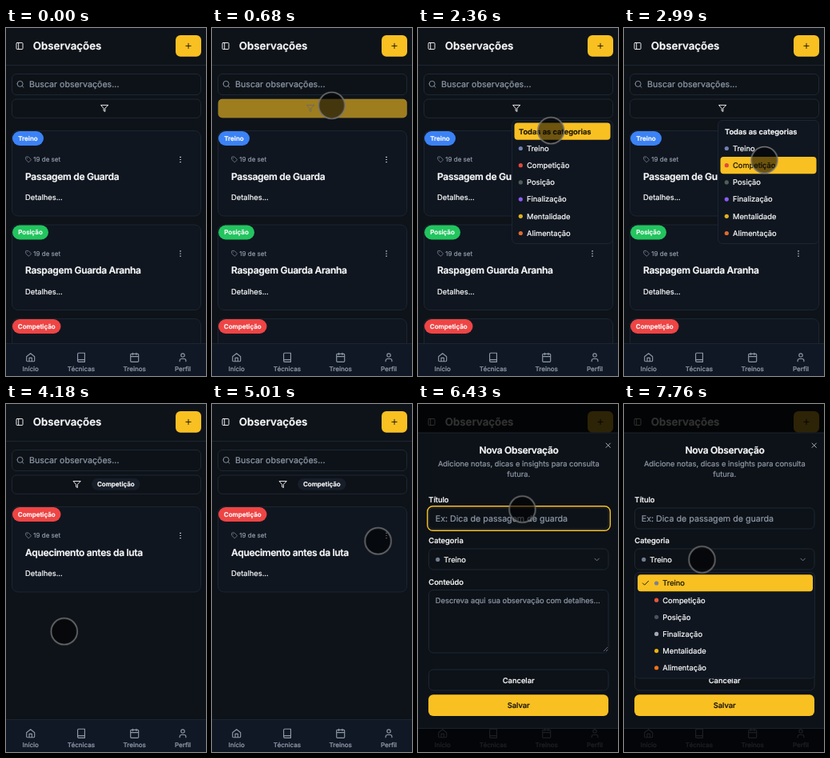
Recreate the animation shown at these times as an HTML page. Size 250 by 435 pixels, loop 8 s.

```html
<!DOCTYPE html>
<html lang="pt-BR">
<head>
<meta charset="utf-8">
<title>Observações</title>
<style>
html, body { margin: 0; width: 100%; height: 100%; overflow: hidden; background: #0e1319; }
svg { display: block; }
#stage { width: 250px; height: 435px; font-family: Inter, "Open Sans", sans-serif; }
text { text-rendering: geometricPrecision; stroke-width: .22px; stroke-linejoin: round; }
.bg { fill: #0e1319; }
.card { fill: #0f1620; stroke: #1c2531; }
.field { fill: #0d1218; stroke: #1e2733; }
.bar { fill: #101826; }
.gold { fill: #f9c022; }
.pill { fill: #171e29; }

/* One loop is 8000 ms: 1% = 80 ms */
.anim, .cut { animation: 8s linear infinite; }
.cut { animation-timing-function: step-end; }
.hover { animation-name: hover; }
.all { animation-name: all; }
.filtered { animation-name: filtered; }
.menu { animation-name: menu; transform-origin: 180px 115px; }
.hot0 { animation-name: hot0; }
.hot1 { animation-name: hot1; }
.hot2 { animation-name: hot2; }
.add { animation-name: add; }
.overlay { animation-name: overlay; }
.dialog { animation-name: dialog; transform-origin: 125px 221px; }
.focus { animation-name: focus; }
.options { animation-name: options; transform-origin: 125px 210px; }
.cursor { animation-name: path; }
.seen { animation-name: seen; }
.press { animation-name: press; }

@keyframes hover {
  0%, 7.4% { opacity: 0; }
  9.2%, 22.7% { opacity: 1; }
  24.5%, 100% { opacity: 0; }
}
@keyframes all { 0% { opacity: 1; } 41.4%, 100% { opacity: 0; } }
@keyframes filtered { 0% { opacity: 0; } 41.4%, 100% { opacity: 1; } }
@keyframes menu {
  0%, 22.7% { opacity: 0; transform: translateY(-5px) scale(.95); }
  24.5%, 41.4% { opacity: 1; transform: none; }
  43%, 100% { opacity: 0; transform: scale(.95); }
}
@keyframes hot0 { 0% { opacity: 0; } 27.2% { opacity: 1; } 32.2%, 100% { opacity: 0; } }
@keyframes hot1 { 0% { opacity: 0; } 32.2% { opacity: 1; } 36.4%, 100% { opacity: 0; } }
@keyframes hot2 { 0% { opacity: 0; } 36.4%, 100% { opacity: 1; } }
@keyframes add {
  0%, 67% { fill: #f9c022; }
  69%, 100% { fill: #e1ae20; }
}
@keyframes overlay { 0%, 73% { opacity: 0; } 75.5%, 100% { opacity: 1; } }
@keyframes dialog {
  0%, 73% { opacity: 0; transform: scale(.95); animation-timing-function: ease-out; }
  75.5%, 100% { opacity: 1; transform: none; }
}
@keyframes focus { 0% { opacity: 1; } 94.4%, 100% { opacity: 0; } }
@keyframes options {
  0%, 94.4% { opacity: 0; transform: translateY(-4px) scale(.95); }
  96%, 100% { opacity: 1; transform: none; }
}
@keyframes path {
  0%, 2.375% { transform: translate(22px, 414px); animation-timing-function: ease-out; }
  8.75% { transform: translate(150px, 96px); }
  11%, 13.5% { transform: translate(153.5px, 112px); }
  16%, 23.75% { transform: translate(153.5px, 102.5px); }
  31.25% { transform: translate(170px, 136px); }
  37.375%, 40.5% { transform: translate(175.5px, 165px); animation-timing-function: ease-in-out; }
  45.625%, 48.1% { transform: translate(53px, 318px); }
  48.2%, 50.2% { transform: translate(53px, 319px); }
  52.25% { transform: translate(72.5px, 284.5px); animation-timing-function: cubic-bezier(.3, .4, .6, 1); }
  60%, 60.5% { transform: translate(174px, 183px); }
  62.625% { transform: translate(207.5px, 171.5px); animation-timing-function: cubic-bezier(.3, .3, .4, 1); }
  70.5%, 73.5% { transform: translate(230px, 20px); animation-timing-function: cubic-bezier(.5, 0, .7, .8); }
  80.375% { transform: translate(130.5px, 131.5px); }
  82.125%, 82.6% { transform: translate(117px, 142px); animation-timing-function: ease-in-out; }
  89% { transform: translate(100px, 213px); animation-timing-function: ease-in-out; }
  92.625%, 100% { transform: translate(97.5px, 194.5px); }
}
@keyframes seen { 0% { opacity: 0; } 2.375%, 100% { opacity: 1; } }
@keyframes press {
  0% { opacity: 0; }
  21.7% { opacity: 1; } 23.5% { opacity: 0; }
  40.5% { opacity: 1; } 42.2% { opacity: 0; }
  72.1% { opacity: 1; } 73.8% { opacity: 0; }
  93.5% { opacity: 1; } 95.2%, 100% { opacity: 0; }
}
</style>
</head>
<body>
<svg id="stage" viewBox="0 0 250 435"></svg>
<script>
const WHITE = '#f8f9fa', MUTED = '#8e97a5', DARK = '#17140a';
const XS = 8, SM = 9.333, MD = 10.667, LG = 12, XL = 13.333;

const icons = {
  panel: 'M5 3h14a2 2 0 0 1 2 2v14a2 2 0 0 1-2 2H5a2 2 0 0 1-2-2V5a2 2 0 0 1 2-2zM9 3v18',
  plus: 'M5 12h14M12 5v14',
  search: 'M3 11a8 8 0 1 0 16 0a8 8 0 1 0-16 0M21 21l-4.3-4.3',
  funnel: 'M22 3H2l8 9.5V19l4 2v-8.5z',
  tag: 'M12.6 2.6A2 2 0 0 0 11.2 2H4a2 2 0 0 0-2 2v7.2a2 2 0 0 0 .6 1.4l8.7 8.7a2.4 2.4 0 0 0 3.4 0l6.6-6.6a2.4 2.4 0 0 0 0-3.4zM7.5 7.5h.01',
  dots: 'M11.5 5h1M11.5 12h1M11.5 19h1',
  home: 'M3 10l9-7 9 7v9a2 2 0 0 1-2 2H5a2 2 0 0 1-2-2zM9 21v-8h6v8',
  book: 'M4 19.5v-15A2.5 2.5 0 0 1 6.5 2H20v20H6.5a2.5 2.5 0 0 1 0-5H20',
  calendar: 'M5 4h14a2 2 0 0 1 2 2v14a2 2 0 0 1-2 2H5a2 2 0 0 1-2-2V6a2 2 0 0 1 2-2zM3 10h18M8 2v4M16 2v4',
  user: 'M19 21v-2a4 4 0 0 0-4-4H9a4 4 0 0 0-4 4v2M8 7a4 4 0 1 0 8 0a4 4 0 1 0-8 0',
  close: 'M18 6L6 18M6 6l12 12',
  check: 'M20 6L9 17l-5-5',
  chevron: 'M6 9l6 6 6-6'
};

const icon = (name, x, y, size = MD, color = WHITE, weight = 2.1) =>
  `<path d="${icons[name]}" fill="none" stroke="${color}" stroke-width="${weight}" stroke-linecap="round" stroke-linejoin="round"
    transform="translate(${x - size / 2} ${y - size / 2}) scale(${size / 24})"/>`;

// y is the middle of the capitals
const text = (str, x, y, size, color = WHITE, weight = 400, extra = '') =>
  `<text x="${x}" y="${y + size * .364}" font-size="${size}" font-weight="${weight}" fill="${color}" stroke="${color}" ${extra}>${str}</text>`;
const centered = (str, x, y, size, color, weight, extra = '') =>
  text(str, x, y, size, color, weight, 'text-anchor="middle" ' + extra);
const tight = 'letter-spacing="-.3"';

const box = (x, y, w, h, r, cls, extra = '') =>
  `<rect x="${x}" y="${y}" width="${w}" height="${h}" rx="${r}" class="${cls}" ${extra}/>`;
const dot = (x, y, color) => `<circle cx="${x}" cy="${y}" r="2.6" fill="${color}"/>`;
const group = (cls, ...parts) => `<g class="${cls}">${parts.join('')}</g>`;

const tags = {
  Treino: { color: '#3b82f6', width: 39 },
  'Posição': { color: '#22c55e', width: 45 },
  'Competição': { color: '#ef4444', width: 60.5 }
};

const card = (i, tag, title) => {
  const { color, width } = tags[tag];
  return `<g transform="translate(0 ${i * 117.5})">` +
    box(7.5, 128.5, 236, 106.5, 7.5, 'card') +
    box(8, 129, width, 18, 9, '', `fill="${color}"`) +
    centered(tag, 8 + width / 2, 138, XS, WHITE, 600) +
    icon('tag', 28, 164.3, 8, MUTED) + text('19 de set', 34.3, 164.3, XS, MUTED) +
    icon('dots', 218, 164.5, MD, WHITE, 2.6) +
    text(title, 24, 185.3, LG, WHITE, 600, tight) +
    text('Detalhes...', 24, 212, SM, WHITE) + '</g>';
};

const navItem = (name, label, x) =>
  icon(name, x, 411.8, 13.3, MUTED) + centered(label, x, 426.2, XS, MUTED, 500);

const categories = ['Treino', 'Competição', 'Posição', 'Finalização', 'Mentalidade', 'Alimentação'];
const menuDots = ['#6f80b0', '#e0483c', '#4d5f58', '#8b5cf6', '#e0b020', '#e06a2c'];
const selectDots = ['#7d7f92', '#e8563a', '#4b5260', '#a3a7b5', '#eab308', '#f97316'];

const menuRow = (i, color) => i
  ? dot(128.3, 129.3 + i * 21.2, menuDots[i - 1]) + text(categories[i - 1], 136, 129.3 + i * 21.2, SM, color)
  : text('Todas as categorias', 126, 129.3, SM, color, 600);
const hotRow = i => group('cut hot' + i,
  box(120.5, 118.5 + i * 21.2, 120, 21.3, 4, 'gold'), menuRow(i, DARK));

const page = group('',
  box(0, 0, 250, 435, 0, 'bg'),
  icon('panel', 17, 22.5), text('Observações', 33.7, 22.5, XL, WHITE, 600),
  box(212, 9, 32, 26.7, 6, 'anim add'), icon('plus', 228, 22.4, MD, DARK),
  box(0, 46, 250, 1, 0, '', 'fill="#1c2531"'),
  box(7.5, 57.5, 236, 26, 5.5, 'field'),
  icon('search', 18, 70.3, MD, MUTED), text('Buscar observações...', 29, 70.4, MD, MUTED),
  box(7.5, 89, 236, 23.3, 5.5, 'field'),
  group('cut all',
    icon('funnel', 123, 100.4),
    card(0, 'Treino', 'Passagem de Guarda'),
    card(1, 'Posição', 'Raspagem Guarda Aranha'),
    card(2, 'Competição', 'Aquecimento antes da luta')),
  group('cut filtered',
    icon('funnel', 88.5, 100.5),
    box(107, 92.8, 60.5, 15, 7.5, 'pill'), centered('Competição', 137.3, 100.4, XS, WHITE, 600),
    card(0, 'Competição', 'Aquecimento antes da luta')),
  group('anim hover', box(7.7, 88.8, 236, 23.4, 5, 'gold'), icon('funnel', 123, 100.4, MD, DARK)),
  box(0, 394, 250, 41, 0, 'bar'), box(0, 394, 250, 1, 0, '', 'fill="#1c2531"'),
  navItem('home', 'Início', 30.7), navItem('book', 'Técnicas', 94),
  navItem('calendar', 'Treinos', 160.7), navItem('user', 'Perfil', 221));

const menu = group('anim menu',
  box(117.5, 115.5, 126, 154, 5.5, 'card'),
  ...[0, 1, 2, 3, 4, 5, 6].map(i => menuRow(i, WHITE)),
  ...[0, 1, 2].map(hotRow));

const options = group('anim options',
  box(13.5, 210.5, 225, 132.5, 5.5, 'card'),
  box(17, 213.3, 219, 21, 4, 'gold'),
  icon('check', 27, 224, MD, DARK),
  ...categories.map((name, i) =>
    dot(40.6, 224 + i * 21.15, selectDots[i]) +
    text(name, 48.3, 224 + i * 21.15, SM, i ? WHITE : DARK)));

const dialog = group('anim dialog',
  box(0, 36, 250, 370, 0, '', 'fill="#0d1218"'),
  box(0, 35.5, 250, 1, 0, '', 'fill="#1a222d"'), box(0, 405, 250, 1, 0, '', 'fill="#1a222d"'),
  icon('close', 237.7, 51.7, MD, '#b4b9c2'),
  centered('Nova Observação', 126, 57.5, LG, WHITE, 600, tight),
  centered('Adicione notas, dicas e insights para consulta', 125.8, 74.3, SM, MUTED),
  centered('futura.', 125.8, 87.6, SM, MUTED),
  text('Título', 13.3, 119.6, SM, WHITE, 500),
  box(13.5, 130, 224.5, 26, 5.5, 'field'),
  group('cut focus', box(11.7, 127.8, 228.6, 30.4, 7, '', 'fill="none" stroke="#f9c022" stroke-width="1.4"')),
  text('Ex: Dica de passagem de guarda', 21.8, 143.2, MD, MUTED),
  text('Categoria', 13.3, 171, SM, WHITE, 500),
  box(13.5, 181, 224.5, 26, 5.5, 'field'),
  dot(24.7, 194.4, '#727c92'), text('Treino', 32.3, 194.4, SM, WHITE),
  icon('chevron', 223.6, 194.5, MD, '#7c8491'),
  text('Conteúdo', 13.3, 222.4, SM, WHITE, 500),
  box(13.5, 232.5, 224.5, 78.5, 5.5, 'field'),
  text('Descreva aqui sua observação com detalhes...', 21.8, 245.2, SM, MUTED),
  '<path d="M232 309l5-5M235 309l2-2" stroke="#8a93a1" stroke-width=".7"/>',
  box(13.5, 332, 224.5, 26, 5.5, 'field'), centered('Cancelar', 125.7, 345.2, SM, WHITE, 500),
  box(13, 363.3, 225, 26.7, 6, 'gold'), centered('Salvar', 125.7, 376.8, SM, DARK, 500),
  options);

const cursor = group('anim cursor', group('cut seen',
  '<circle r="16.4" fill="#000" fill-opacity=".56" stroke="#777" stroke-width="1.5"/>',
  group('cut press',
    '<circle r="15.4" fill="#111" fill-opacity=".6"/>',
    '<circle r="12.3" fill="#b3a506" fill-opacity=".95"/>')));

document.getElementById('stage').innerHTML = page + menu +
  group('anim overlay', box(0, 0, 250, 435, 0, '', 'fill="#000" fill-opacity=".8"')) +
  dialog + cursor;
</script>
</body>
</html>
```
